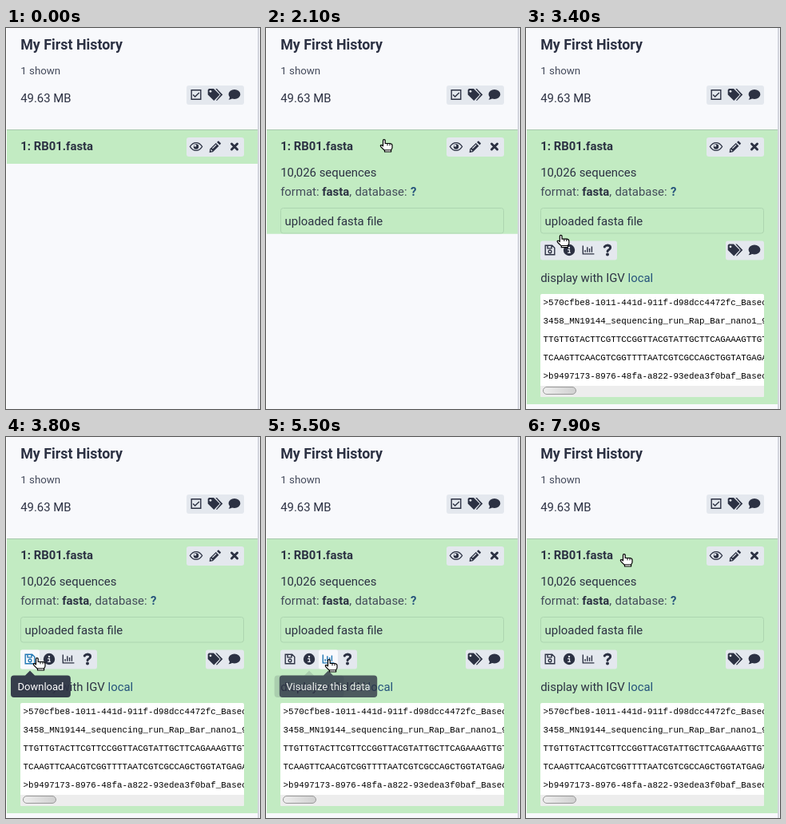
Write an HTML page that moves like this. It is 318x477 px and loops after 8 s.

```html
<!DOCTYPE html>
<html lang="en">
<head>
<meta charset="utf-8">
<title>Dataset history panel</title>
<style>
  html, body { margin: 0; width: 100%; height: 100%; overflow: hidden; background: #f8f9fc; }
  svg { display: block; width: 318px; height: 477px; }
  text { font: 14.9px Roboto, sans-serif; fill: #2c3143; white-space: pre; }
  .bold { font-weight: 700; }
  .title { font-size: 17.85px; font-weight: 700; }
  .small { font-size: 13.35px; fill: #454b5c; }
  .soft { fill: #434b5a; }
  .dark { fill: #2c3143; }
  .link { fill: #25537b; }
  .peek text { font: 10.86px "Liberation Mono", monospace; fill: #000; }
  .tip text { font-size: 13px; fill: #fff; text-anchor: middle; }
  .icon { color: #2c3143; fill: currentColor; }
  .icon .line { fill: none; stroke: currentColor; stroke-width: 1.4; }
  .icon .thick { stroke-width: 3; stroke-linecap: round; }
  .icon .cut { fill: #e4e8ee; }
  .icon .slit { fill: none; stroke: #e4e8ee; stroke-width: 1.2; }
  .hover { fill: #f8f9fc; visibility: hidden; }
  .on .hover { visibility: inherit; }
  .on .icon { color: #2077b3; }
</style>
</head>
<body>
<svg viewBox="0 0 318 477">
  <defs>
    <clipPath id="bodyClip"><rect id="bodyRect" x="1" y="127" width="314" height="43"/></clipPath>
    <clipPath id="peekClip"><rect x="18" y="333" width="280" height="129" rx="2"/></clipPath>
    <linearGradient id="thumb">
      <stop stop-color="#eee"/><stop offset="1" stop-color="#d0d0d0"/>
    </linearGradient>
  </defs>

  <rect width="318" height="477" fill="#f8f9fc"/>
  <rect width="1" height="477" fill="#fff"/>
  <rect x="315" width="2" height="477" fill="#d3d5dd"/>

  <text class="title" x="18.2" y="27">My First History</text>
  <text class="small" x="18.2" y="58">1 shown</text>
  <text x="18.2" y="93">49.63 MB</text>
  <g id="headBar"></g>

  <g clip-path="url(#bodyClip)">
    <rect x="1" y="127" width="314" height="344" fill="#c2ebc2"/>
    <rect x="1" y="127" width="314" height="1" fill="#a9c9ae"/>
    <text class="bold" x="18.2" y="153">1: RB01.fasta</text>
    <g id="dataBar"></g>
    <g id="details">
      <text x="18.2" y="186">10,026 sequences</text>
      <text class="soft" x="18.2" y="210">format: <tspan class="bold dark">fasta</tspan>, <tspan dx=".6">database: </tspan><tspan dx=".8" class="bold link">?</tspan></text>
      <rect x="18.5" y="225.5" width="279" height="31.5" rx="3" fill="none" stroke="#add5b0"/>
      <text x="23.6" y="247">uploaded fasta file</text>
      <g id="toolBar"></g>
      <g id="tagBar"></g>
      <text x="18.2" y="318">display with IGV <tspan class="link">local</tspan></text>
      <g class="peek" clip-path="url(#peekClip)">
        <rect x="18" y="333" width="280" height="129" fill="#fff"/>
        <g id="peekRows"></g>
        <rect x="18" y="448" width="280" height="14" fill="#ededed"/>
        <rect x="21.5" y="449.5" width="41" height="9" rx="4.5" fill="url(#thumb)" stroke="#989898"/>
      </g>
    </g>
  </g>

  <g id="tips"></g>
  <g id="hand" stroke="#000" stroke-width="1.2" stroke-linejoin="round">
    <path fill="#fff" d="M4.5 2Q4.5 .7 5.8 .7Q7.2 .7 7.2 2V5.5H13.5Q16 6 16 8V11Q15.8 12.5 14.6 13.5V16H6.5V14.2Q4 12 2 9.8Q.7 8.3 2 7.6Q3.2 7.3 4.5 8.8Z"/>
    <path fill="none" stroke-width="1" d="M10 5.5V8.3M13 5.5V8.3M6.5 13.8H14.6"/>
  </g>
</svg>
<script>
const LOOP = 8000, STEP = 100, CELL = 24;
const $ = id => document.getElementById(id);

// Icons are drawn around their own centre, in pixels
const path = (d, cls = "") => `<path class="${cls}" d="${d}"/>`;
const dot = (x, y, r, cls = "") => `<circle class="${cls}" cx="${x}" cy="${y}" r="${r}"/>`;
const ICONS = {
  check: path("M-5.8-5.8H5.8V5.8H-5.8zM-3.9 0L-1.3 2.5L3.9-2.6", "line"),
  tags: path("M-9.3-6L-8-7.4H-2L5.6 0L-1.7 7.4L-9.3 0zM.3-7.4H2L9.3 0L2 7.4L1 7L6.8 0z") + dot(-6, -4.2, 1.4, "cut"),
  comment: `<ellipse cy="-.6" rx="7.4" ry="6"/>` + path("M-5.6 2Q-5.8 4.5-7.3 6.3Q-4.5 6.4-2 4.2z"),
  eye: path("M-7.6 0Q-4.5-4.9 0-4.9T7.6 0Q4.5 4.9 0 4.9T-7.6 0z", "line") + dot(0, 0, 3.2) + dot(-1.2, -1.2, 1.4, "cut"),
  pencil: path("M.8-4.5L-6.8 3.1L-7.4 7.4L-3.1 6.8L4.5-.8zM2-5.6L4-7.2L7.2-4L5.6-2z") + path("M-3.6 2.4L1.2-2.4M-5.6 4L-4 5.6", "slit"),
  cross: path("M-3.5-3.5L3.5 3.5M3.5-3.5L-3.5 3.5", "line thick"),
  save: path("M-5.8-5.8H2.7L5.8-2.7V5.8H-5.8zM-3-5.8V-2.1H2V-5.8", "line") + dot(0, 1.9, 1.85, "line"),
  info: dot(0, 0, 7.2) + dot(0, -3, 1.2, "cut") + path("M-1.8-.3H.5V3.3M-1.8 3.3H1.8", "slit"),
  chart: path("M-6.7-5.6V4.9H7.4M-3.9 0V2.8M-1.2-3.7V2.8M1.6-1.9V2.8M4.4-4.6V2.8", "line"),
  help: path("M-3.7-4Q-2.3-5.9 .2-5.9Q3.6-5.7 3.6-3Q3.6-1.4 1.6-.3Q.1 .6 .1 1.6", "line thick") + dot(0, 5.4, 2)
};

function bar(id, x, y, names) {
  $(id).innerHTML = `<rect x="${x}" y="${y}" width="${CELL * names.length}" height="${CELL}" rx="3" fill="#e4e8ee"/>`
    + names.map((name, i) => {
      const left = x + CELL * i;
      return `<g class="button"><rect class="hover" x="${left}" y="${y}" width="${CELL}" height="${CELL}" rx="2"/>
        <g class="icon" transform="translate(${left + 12} ${y + 11.5})">${ICONS[name]}</g></g>`;
    }).join("");
}

bar("headBar", 226, 72, ["check", "tags", "comment"]);
bar("dataBar", 226, 137, ["eye", "pencil", "cross"]);
bar("toolBar", 18, 266.5, ["save", "info", "chart", "help"]);
bar("tagBar", 250, 266.5, ["tags", "comment"]);

$("peekRows").innerHTML = [
  "&gt;570cfbe8-1011-441d-911f-d98dcc4472fc_Basec",
  "3458_MN19144_sequencing_run_Rap_Bar_nano1_9",
  "TTGTTGTACTTCGTTCCGGTTACGTATTGCTTCAGAAAGTTGT",
  "TCAAGTTCAACGTCGGTTTTAATCGTCGCCAGCTGGTATGAGA",
  "&gt;b9497173-8976-48fa-a822-93edea3f0baf_Basec"
].map((row, i) => `<text x="21.6" y="${346.5 + 23.1 * i}">${row}</text>`).join("");

// Tooltips sit under their button and keep clear of the left edge
function makeTip(label, i) {
  const tip = document.createElementNS("http://www.w3.org/2000/svg", "g");
  tip.setAttribute("class", "tip");
  tip.innerHTML = `<path fill="#2c3143" fill-opacity=".93"/><text y="317">${label}</text>`;
  $("tips").append(tip);
  const [box, text] = tip.children;
  const width = text.getComputedTextLength() + 17, arrow = 30 + CELL * i;
  const left = Math.max(6, arrow - width / 2);
  text.setAttribute("x", left + width / 2);
  box.setAttribute("d", `M${left + 4} 298.4H${arrow - 6}l6-6l6 6H${left + width - 4}q4 0 4 4V322q0 4-4 4H${left + 4}q-4 0-4-4V302.4q0-4 4-4z`);
  return tip;
}
const tips = ["Download", "View details", "Visualize this data", "Tool Help"].map(makeTip);
const buttons = $("toolBar").querySelectorAll(".button");

// Each tool is active from its own time to the next one
const SWITCH = [3500, 4450, 5250, 6250, 7350];
const FADE = 300, HOVER_LAG = 100;

const MOVES = [
  { from: 400, to: 1100, x: 142, y: 139 },
  { from: 2700, to: 3600, x: 33, y: 276 },
  { from: 4400, to: 4800, x: 50, y: 277 },
  { from: 5200, to: 5500, x: 73, y: 278 },
  { from: 6100, to: 6600, x: 103, y: 280 },
  { from: 7300, to: 7900, x: 117, y: 146 }
];

const ramp = (t, from, to) => Math.min(1, Math.max(0, (t - from) / (to - from)));
const smooth = u => u * u * (3 - 2 * u);

// The pointer's sideways motion eases harder, which bends its path
function pointer(t) {
  let x = 139.5, y = -18;
  for (const m of MOVES) {
    const u = smooth(ramp(t, m.from, m.to));
    x += (m.x - x) * smooth(u);
    y += (m.y - y) * u;
  }
  return `${x.toFixed(1)} ${y.toFixed(1)}`;
}

function draw(time) {
  const t = Math.floor(time % LOOP / STEP) * STEP;
  const open = smooth(ramp(t, 2000, 2280));
  $("bodyRect").setAttribute("height", 43 + 301 * open);
  $("details").setAttribute("visibility", open ? "visible" : "hidden");
  $("hand").setAttribute("transform", `translate(${pointer(t)})`);

  tips.forEach((tip, i) => {
    const on = SWITCH[i], off = SWITCH[i + 1];
    tip.setAttribute("opacity", ramp(t, on, on + FADE) - ramp(t, off, off + FADE));
    buttons[i].classList.toggle("on", t >= on + HOVER_LAG && t < off + HOVER_LAG);
  });
}

const start = performance.now();
function tick() {
  draw(performance.now() - start);
  requestAnimationFrame(tick);
}
tick();
</script>
</body>
</html>
```
